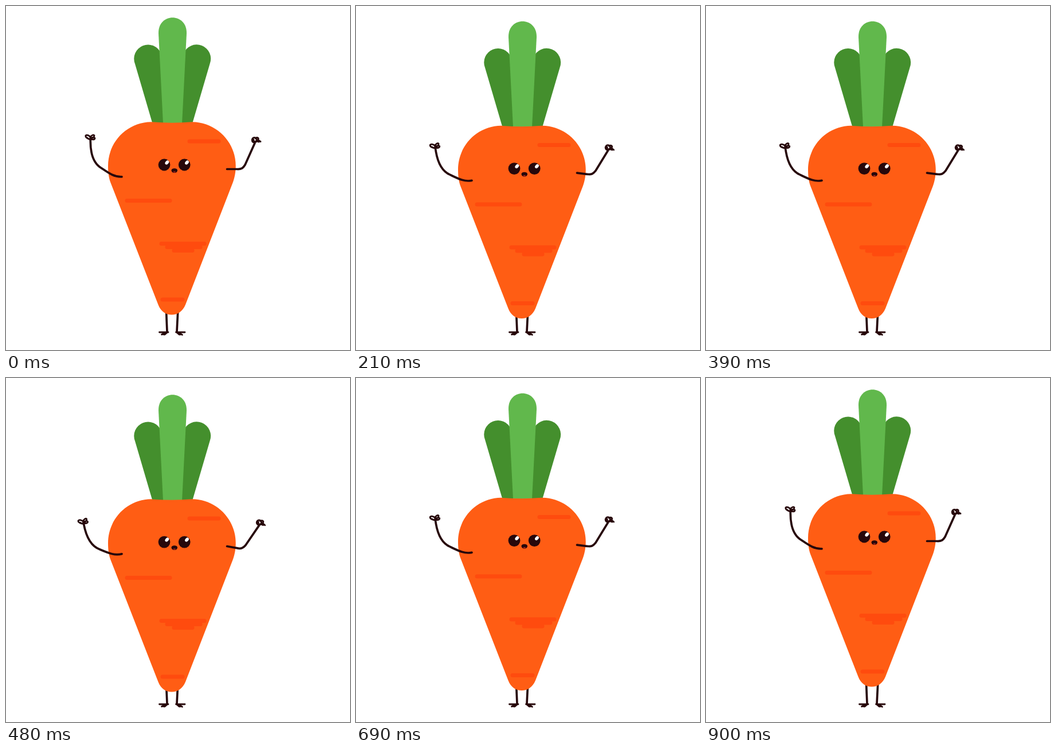
These frames come from a looping animation (600 px wide and 600 px high, 0.93 s). An HTML page:

```html
<!DOCTYPE html>
<html lang="en">
<head>
<meta charset="utf-8">
<title>Bouncing carrot</title>
<style>
  html, body { margin: 0; width: 100%; height: 100%; overflow: hidden; background: #fff; }
  svg { display: block; width: 100vw; height: 100vh; }
  .line { fill: none; stroke: #27080b; stroke-width: 3.7; stroke-linecap: round; stroke-linejoin: round; }
  .thin { stroke-width: 2.8; }
  .mark { fill: none; stroke: #ff4b0e; stroke-width: 7; stroke-linecap: round; }
</style>
</head>
<body>
<svg viewBox="0 0 600 600">
  <g class="line">
    <path d="M279.5 528 Q280 548 281 568 M300 528 Q299 548 298 568"/>
    <path class="thin" d="M283 569 L267.5 569 M280.5 569 Q276 570 271.5 573 M281 569.5 L277 573 L273 572.5"/>
    <path class="thin" d="M296.5 569 L312 569 M298.5 569 Q303 570 307.5 573.5 M298 569.5 L302 573 L306 572.5"/>
  </g>

  <g id="body">
    <g fill="#448f2d">
      <path d="M255.5 205 L225 101 A24 24 0 0 1 270.5 83 L290 205 Z"/>
      <path d="M325 205 L355.5 101 A24 24 0 0 0 309.5 83 L290 205 Z"/>
    </g>
    <path fill="#61b84c" d="M274 205 L266 48 C265 11 316 11 315 48 L307 205 Z"/>
    <path fill="#ff5d14" d="M253 202.3 Q290 205 325 202.3 C367 203 400.7 237 400.7 279 C400.7 290 399 298 396 307 L313 521
      C308 533 299 538.5 289 538.5 C279 538.5 270 533 265.5 521 L182 307 C179 298 178 290 178 279 C178 237 211 203 253 202.3 Z"/>
    <path class="mark" d="M320 236 H371 M211 339.5 H286 M271 414.5 H346 M281 420.5 H339 M293 426.5 H325 M273 512 H308"/>

    <g fill="#27080b">
      <circle cx="276" cy="277" r="10.4"/>
      <circle cx="311.2" cy="277" r="10.4"/>
      <path d="M288.5 286.5 C288.5 282 299 282 299 286.5 C299 289 297 291 293.800 291 C290.500 291 288.500 289 288.500 286.500 Z"/>
    </g>
    <ellipse cx="293.8" cy="289.4" rx="2.3" ry="1" fill="#b0251f"/>
    <g fill="#fff">
      <ellipse cx="280.8" cy="273" rx="2.8" ry="4" transform="rotate(40 280.8 273)"/>
      <ellipse cx="315.5" cy="273" rx="2.8" ry="4" transform="rotate(40 315.5 273)"/>
    </g>

    <g id="left" class="line">
      <path d="M202 297.8 C189 298.5 180 292 166 282.5 C152 274 147 257 147.3 234"/>
      <path class="thin" d="M147 233 C143 232 138 229 139 226 C141 224 146 226 147 229 C148 232 144 233 142 230
        M147 229 C149 225 153 224 154 226 C154 229 150 231 147 231 C151 228 155 229 155 231 C154 234 150 233 147 232"/>
    </g>
    <g id="right" class="line">
      <path d="M385.5 284.5 H403 C411 285 414 282 417 277 L434 239"/>
      <path class="thin" d="M434 238 C429 238 428 234 430 231 C433 228 438 230 437 234 C436 238 431 237 432 233
        M435 231 C438 228 441 230 440 233 C439 237 435 238 433 236 M440 234 L444 236.5 M438 236 L441 237"/>
    </g>
  </g>
</svg>
<script>
  const LOOP = 930, STEP = 30, BOB = 300;
  const DROP = 10, SWING_L = -12.7, SWING_R = 11.3;
  const [body, left, right] = ['body', 'left', 'right'].map(id => document.getElementById(id));
  const start = performance.now();

  function draw(now) {
    const t = Math.floor(Math.max(0, now - start) % LOOP / STEP) * STEP;
    const k = (1 - Math.cos(2 * Math.PI * t / BOB)) / 2;
    body.setAttribute('transform', `translate(0 ${DROP * k})`);
    left.setAttribute('transform', `rotate(${SWING_L * k} 202 297.8)`);
    right.setAttribute('transform', `rotate(${SWING_R * k} 385.5 284.5)`);
    requestAnimationFrame(draw);
  }
  draw(start);
</script>
</body>
</html>
```
